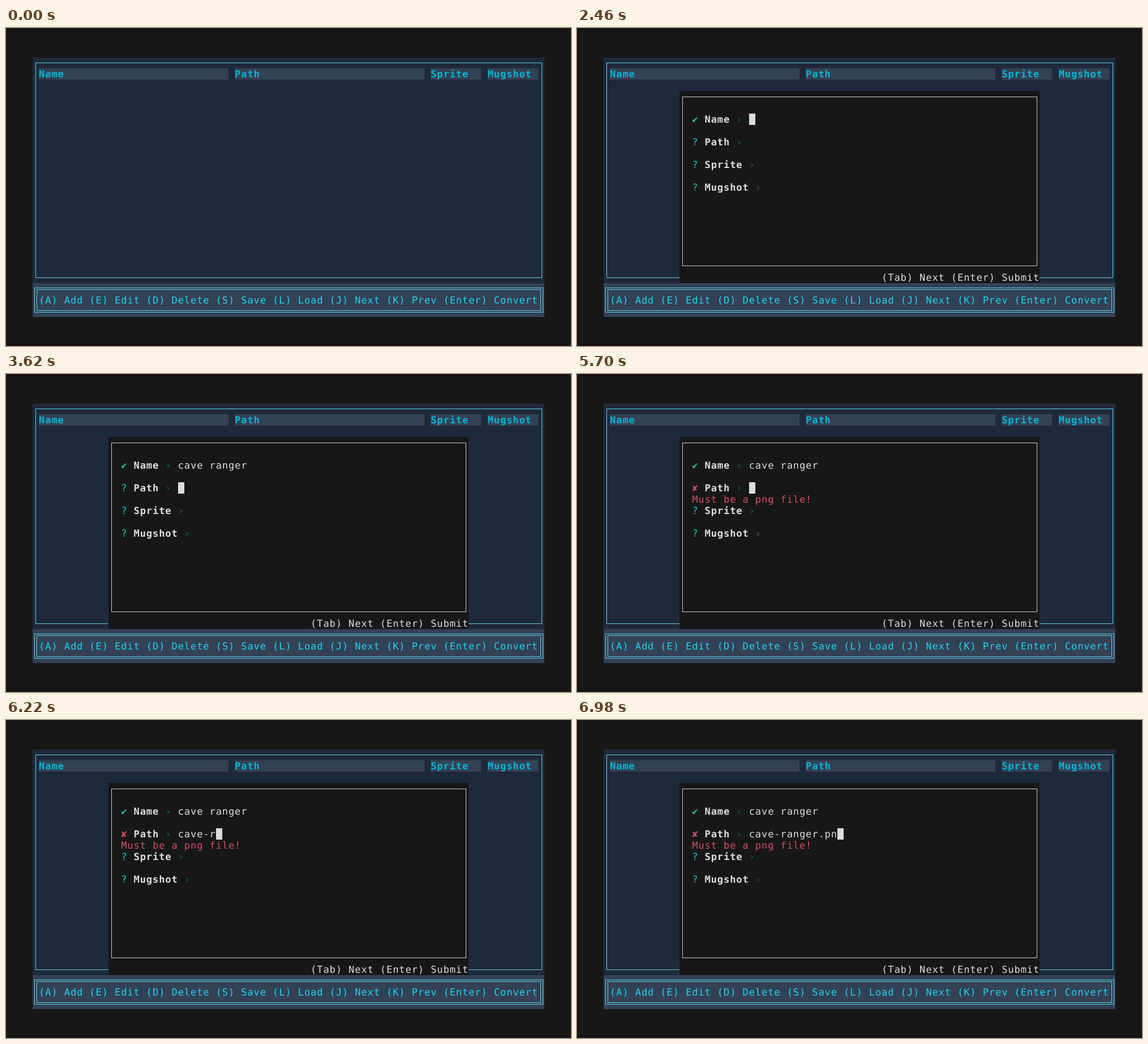
Recreate the animation shown at these times as an HTML page with a canvas. Size 998 px wide and 561 px high, loop 8000 ms.

```html
<!DOCTYPE html>
<html lang="en">
<head>
<meta charset="utf-8">
<title>Terminal form</title>
<style>
  html, body { margin: 0; width: 100%; height: 100%; overflow: hidden; background: #171717; }
  canvas { display: block; }
</style>
</head>
<body>
<canvas id="screen" width="998" height="561"></canvas>
<script>
const ctx = document.getElementById("screen").getContext("2d");
const LOOP = 8000;
const CELL = { w: 11.163, h: 19.93, x: 46.9, y: 51.5 };
const FONT = '17.15px "DejaVu Sans Mono", monospace';
const ASCENT = 15.95;
const COLOR = {
  back: "#171717", panel: "#1e293b", bar: "#334155", border: "#5fd3e4",
  heading: "#06b6d4", keys: "#22d3ee", text: "#dddddd", frame: "#cfcfcf",
  prompt: "#14c8c8", arrow: "#106a6b", valid: "#24bfa0", error: "#cd5167"
};

// Moments of the steps, in ms
const OPEN = 500, NAME_VALID = 2460, NEXT_FIELD = 3620, PATH_ERROR = 5700;
const NAME = {
  text: "cave ranger",
  keys: [2500, 2580, 2700, 2780, 2900, 2980, 3140, 3220, 3340, 3420, 3540]
};
const PATH = {
  text: "cave-ranger.png",
  keys: [5740, 5820, 5940, 6020, 6140, 6220, 6300, 6420, 6540, 6620, 6740, 6820, 6900, 6980]
};

const colX = col => CELL.x + col * CELL.w;
const rowY = row => CELL.y + row * CELL.h;

function fill(col, row, cols, rows, color) {
  const x = Math.round(colX(col)), y = Math.round(rowY(row));
  ctx.fillStyle = color;
  ctx.fillRect(x, y, Math.round(colX(col + cols)) - x, Math.round(rowY(row + rows)) - y);
}

function write(col, row, text, color, bold = false) {
  ctx.font = (bold ? "bold " : "") + FONT;
  ctx.fillStyle = color;
  [...text].forEach((char, i) => ctx.fillText(char, colX(col + i), rowY(row) + ASCENT));
}

function box(left, top, right, bottom, color) {
  ctx.strokeStyle = color;
  ctx.strokeRect(left + 0.5, top + 0.5, right - left, bottom - top);
}

function drawTable() {
  fill(0, 0, 81, 20, COLOR.panel);
  box(52, 61, 946, 440, COLOR.border);
  const columns = [["Name", 1, 30], ["Path", 32, 30], ["Sprite", 63, 8], ["Mugshot", 72, 8]];
  for (const [label, col, width] of columns) {
    fill(col, 1, width, 1, COLOR.bar);
    write(col, 1, label, COLOR.heading, true);
  }
}

function drawKeys() {
  fill(0, 20, 81, 3, COLOR.bar);
  box(50, 458, 948, 501, COLOR.border);
  box(54, 461, 944, 498, COLOR.border);
  write(1, 21, "(A) Add (E) Edit (D) Delete (S) Save (L) Load (J) Next (K) Prev (Enter) Convert", COLOR.keys);
}

const MARKS = { "?": COLOR.prompt, "✔": COLOR.valid, "✘": COLOR.error };

function drawField(row, label, mark = "?", value = "", focused = false) {
  const arrowCol = 17 + label.length;
  write(14, row, mark, MARKS[mark]);
  write(16, row, label, COLOR.text, true);
  write(arrowCol, row, "›", COLOR.arrow);
  write(arrowCol + 2, row, value, COLOR.text);
  if (focused) fill(arrowCol + 2 + value.length, row, 1, 1, COLOR.text);
}

const typed = (input, time) => input.text.slice(0, input.keys.filter(key => key <= time).length);

function drawForm(time) {
  const onPath = time >= NEXT_FIELD, failed = time >= PATH_ERROR;
  fill(12, 3, 57, 17, COLOR.back);
  box(186, 121, 812, 419, COLOR.frame);
  drawField(5, "Name", time >= NAME_VALID ? "✔" : "?", typed(NAME, time), !onPath);
  drawField(7, "Path", failed ? "✘" : "?", typed(PATH, time), onPath);
  if (failed) write(14, 8, "Must be a png file!", COLOR.error);
  drawField(9, "Sprite");
  drawField(11, "Mugshot");
  write(44, 19, "(Tab) Next (Enter) Submit", COLOR.text);
}

function draw(time) {
  ctx.fillStyle = COLOR.back;
  ctx.fillRect(0, 0, 998, 561);
  drawTable();
  drawKeys();
  if (time >= OPEN) drawForm(time);
}

ctx.textRendering = "geometricPrecision";
ctx.lineWidth = 1;
const start = performance.now();
function tick() {
  draw((performance.now() - start) % LOOP);
  requestAnimationFrame(tick);
}
tick();
</script>
</body>
</html>
```
